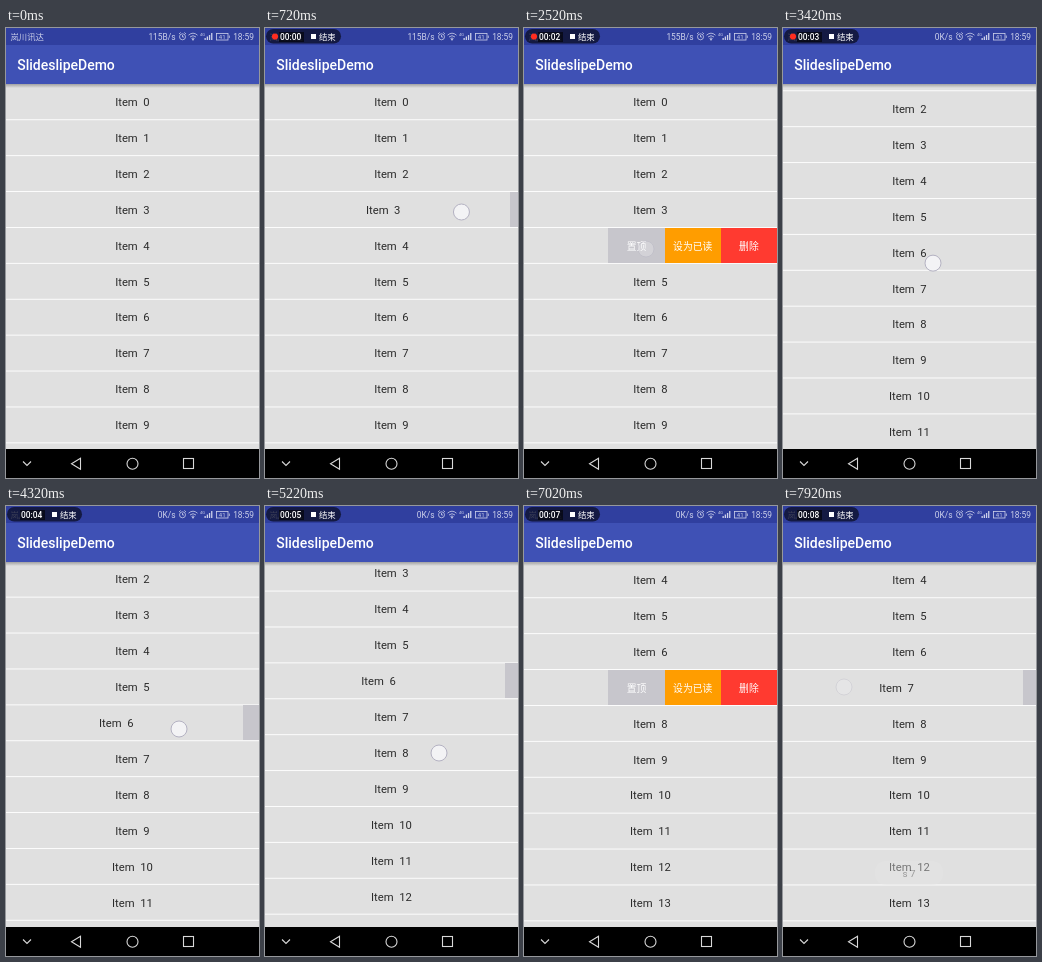
An HTML page that plays this animation: 253 px wide and 450 px high, repeating every 8000 ms.

```html
<!DOCTYPE html>
<html lang="zh">
<head>
<meta charset="utf-8">
<style>
  html, body { margin: 0; height: 100%; overflow: hidden; background: #e0e0e0; }
  svg { display: block; width: 100%; height: 100%; }
  text { font-family: Roboto, "Noto Sans CJK SC", "Noto Sans CJK", sans-serif; white-space: pre; }
  .item { font-size: 11.25px; fill: #2b2b2b; text-anchor: middle; }
  .action { font-size: 9.8px; fill: #fff; text-anchor: middle; }
  .status { font-size: 8.4px; fill: #ccd0ea; }
  .pill text { font-size: 8.4px; fill: #fff; }
  .line { fill: none; stroke: #ccd0ea; stroke-width: .8; }
  .nav { fill: none; stroke: #d8d8d8; stroke-width: 1.1; }
  .menu rect { shape-rendering: crispEdges; }
</style>
</head>
<body>
<svg viewBox="0 0 253 450" preserveAspectRatio="none">
  <defs>
    <linearGradient id="shade" x2="0" y2="1">
      <stop stop-opacity=".28"/><stop offset="1" stop-opacity="0"/>
    </linearGradient>
  </defs>
  <rect width="253" height="450" fill="#e0e0e0"/>
  <g id="list"></g>

  <rect y="56" width="253" height="4" fill="url(#shade)"/>
  <rect y="17" width="253" height="39" fill="#3f51b5"/>
  <rect width="253" height="17" fill="#303f9f"/>
  <text x="11.2" y="42" font-size="14" font-weight="500" fill="#fff">SlideslipeDemo</text>

  <text class="status" x="4.5" y="12">岚川讯达</text>
  <text class="status" id="speed" x="169.5" y="12" text-anchor="end"></text>
  <g class="line">
    <circle cx="176.5" cy="8.8" r="3"/>
    <path d="M176.5 7v2h1.5M173 6l1.7-1.6M180 6l-1.7-1.6"/>
    <path d="M182.5 7.2q4.5-4 9 0M184 9q3-2.6 6 0M185.5 10.6q1.5-1.2 3 0"/>
    <rect x="210.5" y="5.5" width="11.5" height="6.5"/>
    <path d="M223.3 7.5v2.5"/>
  </g>
  <g fill="#ccd0ea">
    <circle cx="187" cy="11.6" r=".9"/>
    <path d="M198.5 12v-2h1.3v2zM200.7 12v-3.5h1.3v3.5zM202.9 12v-5h1.3v5zM205.1 12v-7h1.3v7z"/>
    <text x="194" y="8" font-size="4">4G</text>
    <text x="216.2" y="11" font-size="6" text-anchor="middle">41</text>
  </g>
  <text class="status" x="248" y="12" text-anchor="end">18:59</text>

  <g class="pill" id="pill">
    <rect x="1" y="1" width="75" height="14.5" rx="7.2" fill="#0b0e24" opacity=".75"/>
    <rect x="14" y="4" width="25" height="10" opacity=".6"/>
    <circle id="dot" cx="10" cy="8.5" r="3.1" fill="#ff2d20"/>
    <text id="clock" x="15" y="11.8" font-weight="500"></text>
    <rect x="46" y="6" width="5" height="5" fill="#fff"/>
    <text x="54" y="11.8">结束</text>
  </g>

  <g id="toast">
    <rect x="92" y="355" width="68" height="24" rx="11" fill="#e6e6e6"/>
    <text x="126" y="370.5" font-size="9.8" fill="#333" text-anchor="middle">s 7</text>
  </g>

  <rect y="421" width="253" height="29"/>
  <g class="nav">
    <path d="M17 433.5l4 4 4-4M74.5 430.2v11l-9-5.5z"/>
    <circle cx="126.5" cy="435.7" r="5.5"/>
    <rect x="177.5" y="430.5" width="10" height="10"/>
  </g>
  <circle id="touch" r="8" fill="#f6f6f8" fill-opacity=".85" stroke="#b4b2c2"/>
</svg>
<script>
const LOOP = 8000, STEP = 180;
const PITCH = 35.9, TOP = 56.2, ROW_H = 35.1;
const OPEN = 168.6, PULL = 73, CLOSE_MS = 360, FADE_MS = 200;
const $ = id => document.getElementById(id);
const move = (el, x, y) => el.setAttribute("transform", `translate(${x} ${y})`);
const show = (id, alpha) => $(id).style.opacity = +alpha;

// A finger opens a row (which shuts again at `close`), scrolls the list, or just taps
const gestures = [
  { at: 660, x: 200, y: 184, row: 3, close: 1403 },
  { at: 1400, x: 195, y: 221, row: 4, close: 2800, dur: 1000 },
  { at: 3060, x: 150, y: 300, scroll: 72.4 },
  { at: 4234, x: 180, y: 223, row: 6, close: 4921 },
  { at: 4968, x: 174, y: 289, scroll: 71.2 },
  { at: 5460, x: 190, y: 183, row: 7, close: 7621 },
  { at: 7560, x: 61, y: 181, dur: 240 }
].map(g => ({ dur: 450, ...g }));
const swipes = gestures.filter(g => g.row);
const scrolls = gestures.filter(g => g.scroll);

function ease(t, start, dur) {
  const u = Math.min(1, Math.max(0, (t - start) / dur));
  return u * u * (3 - 2 * u);
}

const actions = [["置顶", "#c7c6cc"], ["设为已读", "#ff9d00"], ["删除", "#ff3a30"]];
const menu = actions.map(([label, color], i) => {
  const w = OPEN / 3, x = 253 + i * w;
  return `<rect x="${x}" width="${w}" height="${ROW_H}" fill="${color}"/>
    <text class="action" x="${x + w / 2}" y="21.8">${label}</text>`;
}).join("");

$("list").innerHTML = Array.from({ length: 16 }, (_, i) =>
  `<g transform="translate(0 ${TOP + i * PITCH})">
    <rect y="${ROW_H}" width="253" height=".9" fill="#fff"/>
    <g id="row${i}" class="menu"><text class="item" x="126.4" y="21.9">Item  ${i}</text>${
      swipes.some(s => s.row === i) ? menu : ""}</g>
  </g>`).join("");

function drawTouch(t) {
  const g = gestures.find(({ at, dur }) => t >= at && t < at + dur + FADE_MS);
  show("touch", !g ? 0 : t > g.at + g.dur ? .3 : 1);
  if (!g) return;
  const k = ease(t, g.at, g.dur);
  move($("touch"), g.x - (g.row ? PULL * k : 0), g.y - (g.scroll || 0) * k);
}

function draw(t) {
  move($("list"), 0, -scrolls.reduce((sum, g) => sum + g.scroll * ease(t, g.at, g.dur), 0));
  for (const { row, at, dur, close } of swipes)
    move($("row" + row), -OPEN * (ease(t, at, dur) - ease(t, close, CLOSE_MS)), 0);
  drawTouch(t);

  show("pill", t >= STEP);
  show("dot", (t + 600) % 1000 < 480);
  show("toast", t >= 7900 ? .4 : 0);
  $("clock").textContent = "00:0" + Math.floor((t + 200) / 1000);
  $("speed").textContent = t < 900 ? "115B/s" : t < 3420 ? "155B/s" : "0K/s";
}

function frame(now) {
  draw(Math.floor(now % LOOP / STEP) * STEP);
  requestAnimationFrame(frame);
}
draw(0);
requestAnimationFrame(frame);
</script>
</body>
</html>
```
